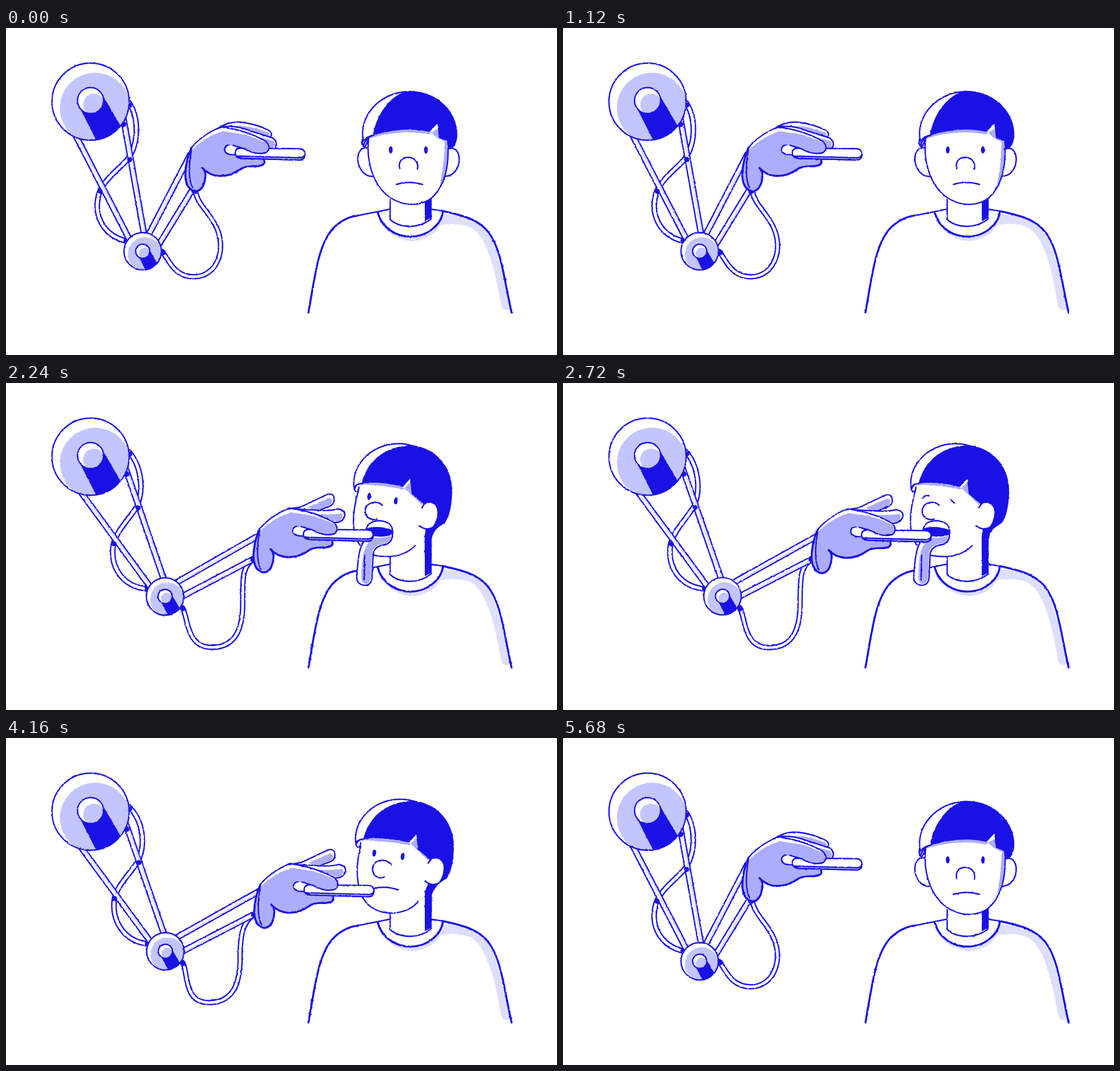
Recreate the animation shown at these times as an HTML page. Size 971x577 px, loop 5.76 s.

```html
<!DOCTYPE html>
<html lang="en">
<head>
<meta charset="utf-8">
<style>
  html, body { margin: 0; width: 100%; height: 100%; overflow: hidden; background: #fff; }
  svg { display: block; width: 971px; height: 577px; }
  path, circle, ellipse { fill: none; stroke-linecap: round; stroke-linejoin: round; vector-effect: non-scaling-stroke; }
  .line { stroke: #1a12e4; stroke-width: 2.4; }
  .bold { stroke: #1a12e4; stroke-width: 3.5; }
  .white { fill: #fff; }
  .ink { fill: #1a12e4; }
  .hand { fill: #adadff; }
  .steel { fill: #c3c5ff; }
  .cloth { fill: #dedeff; }
</style>
</head>
<body>
<svg viewBox="0 0 971 577">
  <defs>
    <filter id="rough" filterUnits="userSpaceOnUse" x="0" y="0" width="971" height="577" color-interpolation-filters="sRGB">
      <feTurbulence id="noise" type="fractalNoise" baseFrequency=".2" numOctaves="2"/>
      <feColorMatrix values="1 0 0 0 0 0 1 0 0 0 0 0 1 0 0 0 0 0 0 1" result="bumps"/>
      <feDisplacementMap in="SourceGraphic" in2="bumps" scale="2.4" xChannelSelector="R" yChannelSelector="G"/>
      <feGaussianBlur stdDeviation=".35"/>
    </filter>
    <clipPath id="disc"><circle r="68"/></clipPath>
    <clipPath id="cap"><circle r="23"/></clipPath>
    <g id="plate">
      <circle class="white" r="68"/>
      <g clip-path="url(#disc)">
        <circle class="steel" cx="8" cy="11" r="62"/>
        <path class="ink" d="M-18,13L12,72L62,58L21,-12Z"/>
      </g>
      <circle class="line" r="68"/>
    </g>
    <g id="knob">
      <circle class="white" r="23"/>
      <circle class="steel" cx="6" cy="7" r="19" clip-path="url(#cap)"/>
      <circle class="line" r="23"/>
    </g>
  </defs>

  <g filter="url(#rough)">
    <rect width="971" height="577" fill="#fff"/>
    <g id="body">
      <path class="cloth" d="M768,329C800,330 835,335 850,360C870,400 880,460 889,496Q878,501 873,492C862,430 850,372 820,352Q795,342 765,348Q750,374 715,376Q680,374 658,342L655,327L712,368Z"/>
      <path class="white" d="M655,325C663,355 690,368 712,368C745,368 768,345 770,323L740,312H680Z"/>
      <path class="bold" d="M533,502C545,435 550,385 575,355Q595,334 620,331M770,323C800,330 830,335 850,360C873,390 877,440 891,502M655,325C663,355 690,368 712,368C745,368 768,345 770,323"/>
      <path class="line" d="M620,331L675,320M751,320L770,323"/>
      <path class="white" d="M677,300V338Q690,350 713,350Q735,349 749,337V296Z"/>
      <path class="ink" d="M738,300H749V335L738,341Z"/>
      <path class="line" d="M677,303V338Q690,350 713,350Q735,349 749,337V300"/>
    </g>
    <g id="head"></g>
    <g id="arm"></g>
  </g>
</svg>
<script>
const LOOP = 5760, STEP = 80;
const $ = id => document.getElementById(id);
const path = (cls, d) => `<path class="${cls}" d="${d}"/>`;
const dot = (x, y, r = 4.5) => `<circle class="ink" cx="${x}" cy="${y}" r="${r}"/>`;
const eye = (x, y, tilt = 0) => `<ellipse class="ink" cx="${x}" cy="${y}" rx="3.3" ry="6.3" transform="rotate(${tilt} ${x} ${y})"/>`;
const stroke = (d, color, width) => `<path d="${d}" stroke="${color}" stroke-width="${width}"/>`;
const tube = (d, width) => stroke(d, '#1a12e4', width) + stroke(d, '#fff', width - 4.8);
const place = (id, x, y, scale) => `<use href="#${id}" transform="translate(${x} ${y}) scale(${scale})"/>`;
const mix = (a, b, p) => a + (b - a) * p;
const ease = u => u < .5 ? 4 * u ** 3 : 1 - 4 * (1 - u) ** 3;
const ramp = (t, from, to) => ease(Math.min(1, Math.max(0, (t - from) / (to - from))));
const swing = (t, from, size) => t < from ? 0 : size * Math.exp((from - t) / 250) * Math.sin((t - from) / 100);

function bar(x1, y1, x2, y2) {
  const len = Math.hypot(x2 - x1, y2 - y1);
  const nx = 1.6 * Math.abs(y2 - y1) / len, ny = 1.6 * Math.abs(x2 - x1) / len * (y2 < y1 ? 1 : -1);
  return tube(`M${x1},${y1}L${x2},${y2}`, 11.5)
    + stroke(`M${x1 + nx},${y1 + ny}L${x2 + nx},${y2 + ny}`, '#dedeff', 3.2);
}

function frontHead() {
  return path('white line', 'M638,212C620,207 614,235 627,252Q634,262 646,262M778,214C795,207 802,225 797,243Q790,262 771,262')
    + path('white', 'M639,190C634,240 650,290 690,306C710,315 735,312 750,300C772,280 780,250 779,205L710,130Z')
    + path('hand', 'M640,195Q695,178 745,188L760,178L765,192L778,197C780,240 776,265 762,289Q772,250 773,201L758,193L746,182Q690,174 648,187Z')
    + path('line', 'M639,195C634,240 650,290 690,306C710,315 735,312 750,300C772,280 780,250 779,212')
    + path('white line', 'M648,189Q636,191 630,200C620,160 655,113 710,112')
    + path('hand', 'M630,200L639,194Q638,203 632,210Q628,206 630,200Z')
    + path('line', 'M648,189Q632,194 630,209Q627,206 628,196M632,210Q637,204 638,196')
    + path('ink line', 'M648,188C655,150 680,118 710,112C760,112 797,150 794,193Q792,206 786,211L780,211L778,198L764,193L761,166L746,182Q700,172 648,188Z')
    + eye(678, 215) + eye(740, 215)
    + path('line', 'M694,248C687,222 730,221 725,249M688,276Q710,269 734,276');
}

// n moves the hairline notch and ear as the head turns towards the viewer
function sideHead(n) {
  const k = n / 3;
  return path('white', 'M621,185C608,235 612,285 640,300C660,309 685,308 700,302L749,262L760,215L700,150Z')
    + path('white line', 'M628,177Q617,177 614,188C606,150 640,107 692,107Q704,107 717,111')
    + path('hand', `M616,186Q625,178 640,180Q670,181 ${700 + n},188L${713 + n},174L${717 + n},192L${737 + n},206L${733 + n},215L${714 + n},197L${699 + n},183Q660,174 628,177Z`)
    + path('line', 'M628,177Q614,178 614,188Q616,194 621,190L622,184')
    + path('ink line', `M628,176C640,135 670,112 717,111C760,118 786,150 785,195C784,222 778,245 768,249Q752,258 ${749 - k},275V305H${739 - k}V270L${742 + k},250L${736 + n},212L${716 + n},195L${713 + n},166L${699 + n},182Q660,172 628,176Z`)
    + path('white', `M${733 + n},218Q${738 + n},208 ${751 + n},211C${766 + n},217 ${763 + n},240 ${753 + n},254Q${742 + n},262 ${728 + n},254Z`)
    + path('line', `M${733 + n},220Q${738 + n},208 ${751 + n},211C${766 + n},217 ${763 + n},240 ${753 + n},254Q${742 + n},262 ${728 + n},252`);
}

function closedMouth() {
  return `<g transform="translate(3 1)">${sideHead(8)}`
    + path('line', 'M622,190C610,235 616,280 640,297C665,315 705,310 724,287') + '</g>'
    + eye(649, 203, 8) + eye(699, 209, 8)
    + path('line', 'M679,224C672,212 648,212 646,231C646,244 658,250 667,245M649,265Q672,261 691,268');
}

function openMouth(shut) {
  const eyes = shut ? path('line', 'M634,203Q638,197 645,199M683,206L690,212') : eye(640, 200, 8) + eye(687, 208, 8);
  return sideHead(0) + eyes
    + path('line', 'M621,190C608,235 610,270 624,286M644,303C675,310 702,306 721,287')
    + path('white line', 'M663,216C657,207 634,208 633,226C633,238 644,243 654,240')
    + path('white line', 'M634,266C633,249 645,243 658,243C678,244 683,255 681,267Q680,284 665,286L645,282Z')
    + path('ink', 'M636,256Q658,251 680,259L681,270H636Z')
    + path('white line', 'M681,266Q682,281 668,285Q649,288 647,302L645,344Q644,357 631,357Q618,355 618,342C621,310 620,272 650,269Q668,272 681,266Z')
    + path('hand', 'M679,269Q679,280 667,283Q646,286 645,302L643,344Q642,355 632,355Q626,353 626,340C628,310 628,284 650,273Q667,274 679,269Z')
    + path('line', 'M632,304L631,347');
}

const backFingers = {
  pinch: path('white line', 'M372,178Q390,165 412,166Q440,169 462,180Q473,187 464,194L410,192Z')
    + path('hand', 'M400,173Q430,171 463,185Q467,190 461,193L415,186Z')
    + path('white line', 'M378,175Q402,170 432,182L470,194Q482,204 472,214Q455,216 430,207L378,192Z')
    + path('hand', 'M392,183Q430,188 471,199Q478,206 469,213L430,206Z'),
  spread: path('white line', 'M376,176L398,173L447,150Q458,148 458,158Q460,168 448,172L410,186Z')
    + path('hand', 'M412,173L450,156Q458,160 453,168L425,180Z')
    + path('white line', 'M384,176L425,178Q450,180 465,176Q478,178 477,188Q473,200 460,200L410,194Z')
    + path('hand', 'M428,185Q455,186 472,184Q476,192 466,198L440,196Z'),
  flick: path('hand line', 'M425,194L457,182Q469,183 467,195Q460,207 430,206Z')
    + path('white line', 'M372,177Q400,165 445,158Q460,147 472,149Q483,154 480,164Q472,172 450,172Z')
    + path('white', 'M372,177Q400,164 440,157Q458,147 470,149Q479,156 470,167Q445,182 405,196L370,200Z')
    + path('hand', 'M368,186Q410,166 446,163L471,155Q476,162 466,170Q445,183 415,193L430,206L375,212Z')
    + path('line', 'M372,177Q400,164 440,157Q458,147 470,149Q479,156 470,167Q445,184 412,194')
};

function hand(pose) {
  const flick = pose === 'flick';
  const stick = path('white line', 'M414,212L518,213Q527,214 527,223Q526,233 518,233L415,230Q404,229 404,221Q404,212 414,212Z')
    + path('hand line', 'M407,226L519,229Q525,228 527,223Q526,233 518,233L415,230Z');
  const finger = path('hand', 'M385,184Q430,186 458,203Q468,212 458,220Q440,225 420,213L390,205Z')
    + stroke('M382,178Q420,182 455,199', '#fff', 4)
    + path('line', 'M382,175Q425,181 458,200Q469,212 458,220Q440,225 420,213L400,207');
  return backFingers[pose]
    + path(flick ? 'hand' : 'white', 'M327,211Q346,188 378,177L420,187L400,210L340,225Z')
    + path('hand', `M327,216Q350,192 382,182L${flick ? '400,195' : '420,188'}L450,212L440,222L456,234Q460,243 440,244Q420,243 412,250Q395,262 375,261Q358,260 346,247Q353,252 351,265Q348,288 333,288Q318,285 316,262Q316,235 327,216Z`)
    + (flick ? stroke('M330,212Q348,192 380,179', '#fff', 4) : '')
    + path('line', 'M327,211Q346,188 380,174M327,211Q326,220 324,235Q321,268 329,282')
    + path('bold', 'M327,211Q316,235 316,262Q318,285 333,288Q348,288 351,265Q353,252 346,247Q358,260 375,261Q395,262 412,250Q420,243 440,244Q458,243 455,234')
    + path('white line', 'M410,206Q385,203 385,215Q387,226 408,223Z')
    + `<g transform="${flick ? 'translate(2 -5) rotate(8.5 415 215)' : ''}">${stick}</g>`
    + (flick ? '' : finger);
}

function arm(p, upperSway, lowerSway, pose) {
  const angle = (70.8 - 9 * p) * Math.PI / 180;
  const ex = 149 + 279.5 * Math.cos(angle), ey = 130 + 279.5 * Math.sin(angle);
  const hx = 122 * p * (1.15 - .15 * p), hy = 47.5 * p * (.6 + .4 * p);
  const at = (x1, y1, x2, y2, s = 0) => `${mix(x1, x2, p) + s},${mix(y1, y2, p)} `;
  const s = upperSway, w = lowerSway;
  const upperCable = `M217,132C${235 + s},160 ${234 + s},205 ${214 + s / 2},232C${196 + s / 2},252 172,268 ${164 + s / 2},292C${153 + s},330 ${171 + s},366 212,376`;
  const lowerCable = 'M' + at(274, 394, 311, 396)
    + 'C' + at(286, 404, 322, 410) + at(293, 439, 316, 467, w) + at(331, 439, 363, 467, w)
    + 'C' + at(372, 439, 408, 467, w) + at(390, 390, 419, 430, w) + at(370, 350, 418, 382, w)
    + 'C' + at(356, 322, 419, 350, w) + at(338, 312, 416, 325) + at(333, 286, 438, 312);
  return `<g transform="rotate(${-9 * p} 149 130)">`
    + tube(upperCable, 10) + dot(218, 136) + dot(212, 375, 5)
    + bar(123, 190, 217, 372) + bar(207, 160, 243, 362)
    + dot(218 + s / 3, 232) + dot(166 + s / 3, 288) + dot(207, 170, 5) + '</g>'
    + tube(lowerCable, 9.5)
    + bar(mix(ex - 3.6, ex - 6, p), mix(ey - 2, ey - 10, p), 325 + hx, 223 + hy)
    + bar(mix(ex + 15, ex + 7, p), mix(ey + 10, ey + 12, p), mix(330, 325, p) + hx, mix(283, 259, p) + hy)
    + dot(mix(277, 312, p), mix(396, 398, p), 5) + dot(mix(332, 438, p), mix(287, 311, p), 5.5)
    + place('plate', 149, 130, 1) + place('knob', 149, 128, 1)
    + place('plate', ex, ey, .485) + place('knob', ex, ey, .54)
    + `<g transform="translate(${hx} ${hy})">${hand(pose)}</g>`;
}

let shown = -1;
function draw(now) {
  const step = Math.floor(now % LOOP / STEP);
  if (step !== shown) {
    shown = step;
    const t = step * STEP;
    const p = ramp(t, 1440, 2400) - ramp(t, 4080, 4800);
    const sway = swing(t, 2400, 8) + swing(t, 4800, -14);
    const jolt = swing(t, 4000, 10);
    const pose = t < 2000 || t >= 5040 ? 'pinch' : t < 4560 ? 'spread' : 'flick';
    $('noise').setAttribute('seed', step % 8 + 1);
    $('head').innerHTML = t < 1360 || t >= 4320 ? frontHead()
      : t < 1520 || t >= 4000 ? closedMouth() : openMouth(t >= 2320);
    $('arm').innerHTML = arm(p, sway + jolt * .6, sway - jolt, pose);
  }
  requestAnimationFrame(draw);
}
requestAnimationFrame(draw);
</script>
</body>
</html>
```
